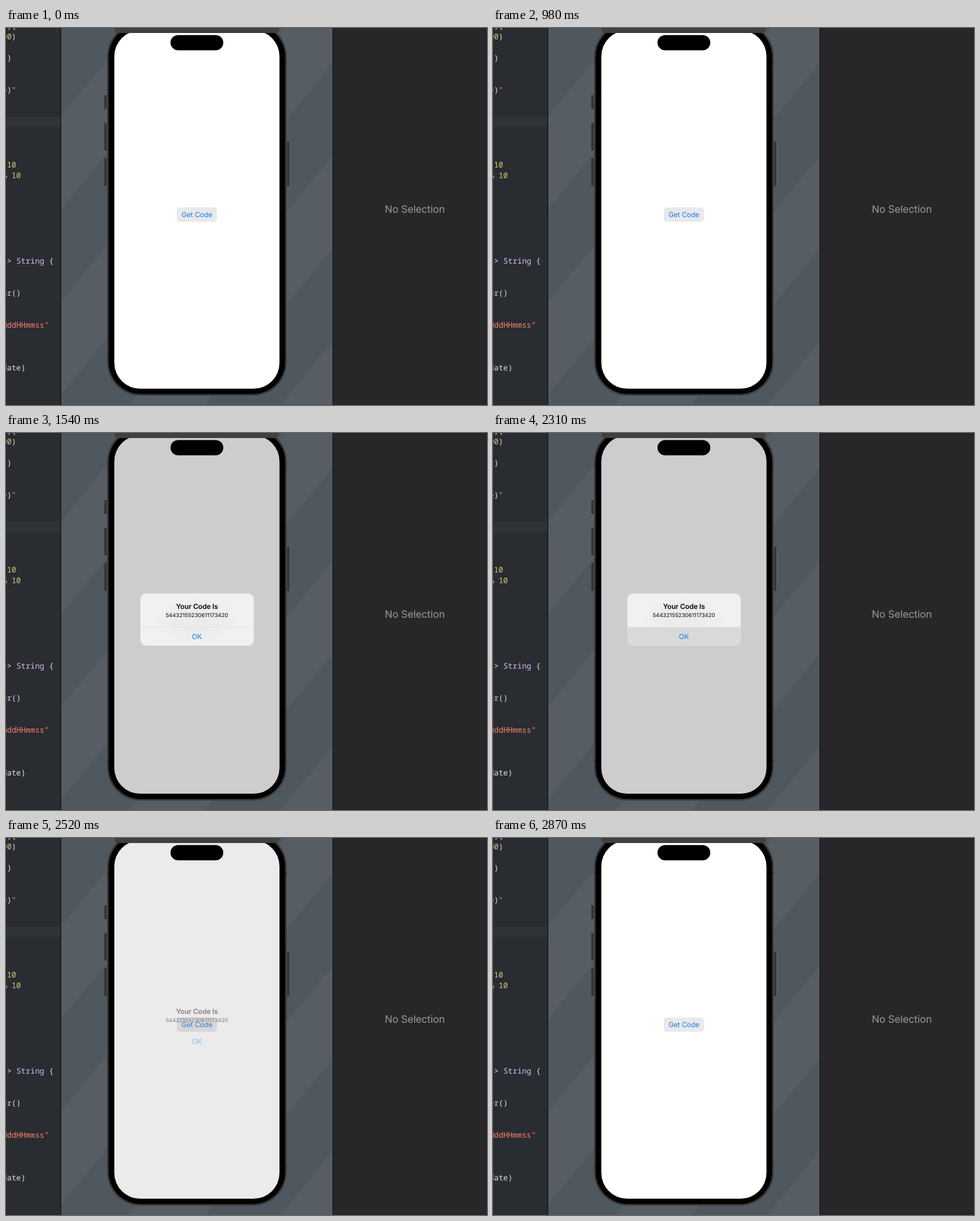
Recreate the animation shown at these times as an HTML page. Size 766 by 600 pixels, loop 3500 ms.

```html
<!DOCTYPE html>
<html lang="en">
<head>
<meta charset="utf-8">
<title>Get Code</title>
<style>
html, body { margin: 0; width: 100%; height: 100%; overflow: hidden; background: #272729; }
svg { display: block; width: 766px; height: 600px; }
text { text-rendering: geometricPrecision; white-space: pre; }
.ui { font-family: Inter, "Liberation Sans", sans-serif; text-anchor: middle; }
.code { font: 500 12.4px "Noto Sans Mono", "DejaVu Sans Mono", monospace; text-anchor: end; fill: #e2e2e3; }
.num { fill: #d9c97c; }
.str { fill: #ff8170; }
.type { fill: #dabaff; }
</style>
</head>
<body>
<svg viewBox="0 0 766 600">
  <defs>
    <clipPath id="editor"><rect width="87" height="600"/></clipPath>
    <clipPath id="canvas"><rect x="88" width="432" height="600"/></clipPath>
    <clipPath id="card"><rect x="214" y="255.5" width="180.5" height="83" rx="9"/></clipPath>
    <radialGradient id="blur">
      <stop offset=".5" stop-color="#ececec"/>
      <stop offset="1" stop-color="#ececec" stop-opacity="0"/>
    </radialGradient>
  </defs>

  <g clip-path="url(#canvas)">
    <rect x="88" width="432" height="600" fill="#565e64"/>
    <g id="stripes" fill="#50585f"></g>
  </g>

  <g clip-path="url(#editor)">
    <rect width="87" height="600" fill="#292c30"/>
    <rect id="lineA" y="141" width="51" height="17"/>
    <rect id="lineB" x="51" y="141" width="36" height="17"/>
    <g id="code" class="code"></g>
  </g>
  <path d="M87.5 0V600M520.5 0V600" stroke="#0c0d0e"/>
  <rect x="521" width="245" height="600" fill="#272729"/>
  <text class="ui" x="651" y="294" font-size="16.1" letter-spacing="-.1" fill="#9a9a9b">No Selection</text>

  <g fill="#343535">
    <rect x="156.5" y="107" width="4" height="22" rx="1"/>
    <rect x="156.5" y="151" width="4" height="44" rx="1"/>
    <rect x="156.5" y="207" width="4" height="44.500" rx="1"/>
    <rect x="447.500" y="181" width="3.500" height="70.500" rx="1"/>
  </g>
  <rect x="161" y="-8" width="286" height="593" rx="53" fill="#3a3a3a"/>
  <rect x="163.500" y="-5.500" width="281" height="588" rx="51" fill="#000"/>
  <path d="M161 55.500h3M161 522h3M444 55.500h3M444 522h3" stroke="#222" stroke-width="2"/>
  <rect x="172.500" y="4" width="263" height="570" rx="41" fill="#fff"/>
  <rect x="272" y="285.500" width="64" height="23" rx="5" fill="#e9e9eb"/>
  <text id="label" class="ui" x="304" y="301.300" font-size="11.200" letter-spacing="-.1">Get Code</text>
  <rect id="dim" x="172.500" y="4" width="263" height="570" rx="41" fill="#000"/>
  <rect x="262" y="11.300" width="84" height="24.200" rx="12.100" fill="#000"/>
  <path d="M173 0H435Q435 8 431 8H177Q173 8 173 0" fill="#40403f"/>

  <g id="alert">
    <g id="panel" clip-path="url(#card)">
      <rect x="214" y="255" width="181" height="84" fill="#f1f1f1"/>
      <ellipse cx="303" cy="297" rx="66" ry="40" fill="url(#blur)"/>
      <rect id="pressed" x="214" y="309" width="181" height="30" fill="#d9d9d9"/>
    </g>
    <path id="rule" d="M214 309H394.500"/>
    <g id="words" class="ui">
      <text x="304.200" y="279.500" font-size="11.200" font-weight="600" letter-spacing="-.15" fill="#0a0a0a">Your Code Is</text>
      <text x="304" y="293.200" font-size="8.700" fill="#0a0a0a">54432155230611173420</text>
      <text x="304" y="328.300" font-size="11.300" fill="#1678f2">OK</text>
    </g>
  </g>
</svg>
<script>
const LOOP = 3500, STEP = 70;
const $ = id => document.getElementById(id);
const set = (id, attrs) => {
  for (const k in attrs) $(id).setAttribute(k, attrs[k]);
};
const clamp = v => Math.max(0, Math.min(1, v));
const mix = (a, b, p) => `rgb(${a.map((v, i) => Math.round(v + (b[i] - v) * p))})`;

// Column edge, baseline, then [class, text] spans
const lines = [
  [2, 1, ['', '){']],
  [2, 18, ['num', '00'], ['', ')']],
  [1, 52, ['', ')']],
  [2, 103, ['', 'e)'], ['str', '"']],
  [2, 222, ['num', '10']],
  [3, 239, ['', '% '], ['num', '10']],
  [10, 375, ['', '-> '], ['type', 'String'], ['', ' {']],
  [3, 426, ['type', 'er'], ['', '()']],
  [9, 477, ['str', 'MddHHmmss"']],
  [4, 545, ['', 'date)']]
];
$('code').innerHTML = lines.map(([col, y, ...spans]) =>
  `<text x="${1.4 + 7.45 * col}" y="${y}">` +
  spans.map(([c, s]) => `<tspan class="${c}">${s.replace('>', '&gt;')}</tspan>`).join('') +
  '</text>').join('');

// Diagonal bands, each crossing the full height
let bands = '';
for (let x = 82; x < 1100; x += 242) {
  bands += `<path d="M${x} 0h121l-492 600h-121z"/>`;
}
$('stripes').innerHTML = bands;

// Remaining distance of a critically damped spring
const spring = ms => {
  const w = Math.max(0, ms) * 0.0193;
  return (1 + w) * Math.exp(-w);
};

function draw(now) {
  const t = Math.floor((now % LOOP) / STEP) * STEP;
  const closing = t >= 2450;
  const open = t >= 1120;
  const p = closing ? (t >= 2870 ? 0 : spring(t - 2415))
    : open ? (t >= 1540 ? 1 : 1 - spring(t - 1015)) : 0;
  const scale = closing ? 1 : 1 + 0.21 * (1 - p);
  const card = closing ? clamp((p - 0.42) / 0.58) : p;

  set('lineA', { fill: t < 140 ? '#313236' : '#2d3337' });
  set('lineB', { fill: t < 980 ? '#313236' : '#2d3337' });
  set('label', { fill: mix([30, 122, 232], [165, 165, 167], closing ? p * 0.6 : clamp(p * 1.6)) });
  set('dim', { opacity: 0.196 * p });
  set('alert', {
    visibility: p > 0 ? 'visible' : 'hidden',
    transform: `translate(304 297) scale(${scale}) translate(-304 -297)`
  });
  set('panel', { opacity: card });
  set('pressed', { opacity: t >= 2310 ? 1 : 0 });
  set('rule', {
    stroke: mix([190, 190, 190], [226, 226, 226], closing ? 1 : p),
    'stroke-width': closing ? 1 : 1 + 0.8 * (1 - p),
    opacity: card
  });
  set('words', { opacity: closing ? clamp(p * 1.15) : clamp(p * 1.1) });
}

const start = performance.now();
function tick() {
  draw(performance.now() - start);
  requestAnimationFrame(tick);
}
tick();
</script>
</body>
</html>
```
